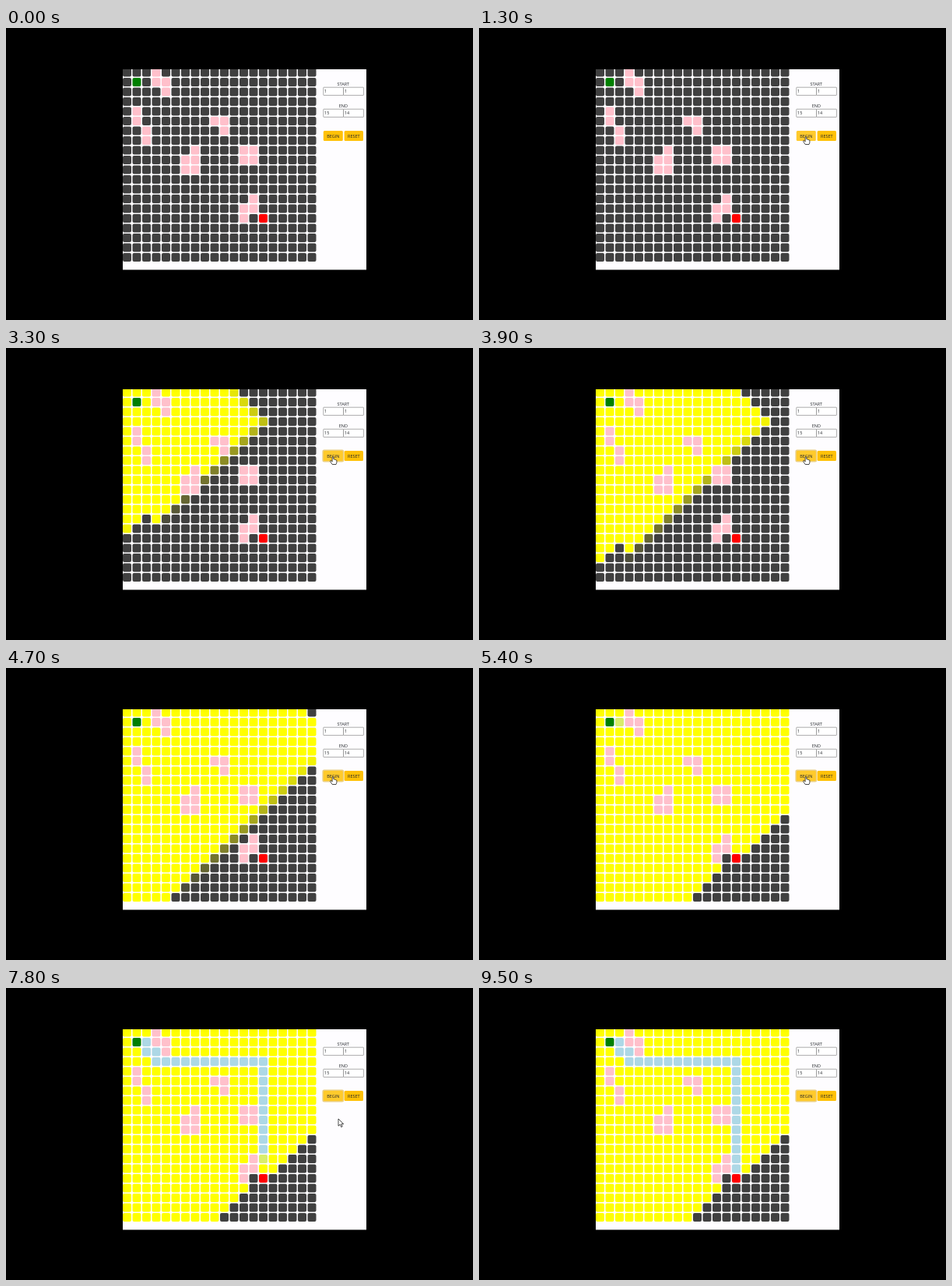
These frames come from a looping animation (600x375 px, 9.6 s). An HTML page:

```html
<!DOCTYPE html>
<html lang="en">
<head>
<meta charset="utf-8">
<title>Breadth-first search</title>
<style>
  html, body { margin: 0; width: 100%; height: 100%; overflow: hidden; background: #000; }
  svg { display: block; width: 100vw; height: 100vh; }
  text { font: 5.5px "Open Sans", "Noto Sans", sans-serif; fill: #212529; }
</style>
</head>
<body>
<svg id="stage" viewBox="0 0 600 375">
  <defs><clipPath id="panel"><rect x="150" y="53" width="313" height="257.5"/></clipPath></defs>
  <rect width="600" height="375"/>
  <rect x="150" y="53" width="313" height="257.5" fill="#fefdff"/>
  <g id="grid" clip-path="url(#panel)"></g>
  <g id="form"></g>
  <g id="arrow" display="none">
    <path d="M0 0V9.2L2.2 7.2L3.7 10.6L5.2 9.9L3.8 6.7H6.7Z" fill="#fff" stroke="#000" stroke-width=".7"/>
  </g>
  <g id="hand" display="none">
    <path d="M-.9 .6Q0 -.6 .9 .6V3.4Q1.9 2.9 2.4 3.8Q3.4 3.4 3.8 4.3Q4.8 4.2 4.9 5.2V7.2Q4.8 8.6 4 10H-.8Q-2.4 8 -3.4 5.9Q-3.4 4.7 -2.2 5.1L-.9 6.4Z"
      fill="#fff" stroke="#000" stroke-width=".7" stroke-linejoin="round"/>
  </g>
</svg>
<script>
const LOOP = 9600, STEP = 100, SIZE = 20;
const VISIT_AT = 1970, VISIT_GAP = 10, PATH_AT = 5330, PATH_GAP = 100, FADE = 150;
const DARK = [64, 64, 64], YELLOW = [255, 255, 0], BLUE = [173, 216, 230];
const AMBER = [255, 193, 7], AMBER_HOVER = [255, 202, 44];
const START = [1, 1], END = [14, 15];
const WALLS = {
  0: [3], 1: [3, 4], 2: [4], 4: [1], 5: [1, 9, 10], 6: [2, 10], 7: [2],
  8: [7, 12, 13], 9: [6, 7, 12, 13], 10: [6, 7], 13: [13], 14: [12, 13], 15: [12]
};
// Pointer stops: time, x, y
const POINTER_IN = [[600, 289, 241], [800, 322, 216], [1000, 376, 172], [1200, 415, 143], [1300, 420, 139.5]];
const POINTER_OUT = [[7400, 420, 139.5], [7800, 427, 168], [8100, 449, 230], [8300, 451, 258], [8600, 447, 242], [8900, 455, 186]];

const $ = id => document.getElementById(id);
const clamp = v => Math.max(0, Math.min(1, v));
const mix = (a, b, k) => a.map((v, i) => v + (b[i] - v) * k);
const rgb = c => `rgb(${c.map(Math.round)})`;
const key = (x, y) => y * SIZE + x;
const isWall = (x, y) => (WALLS[y] || []).includes(x);

function add(parent, tag, attrs, label) {
  const el = document.createElementNS("http://www.w3.org/2000/svg", tag);
  for (const name in attrs) el.setAttribute(name, attrs[name]);
  if (label) el.textContent = label;
  return parent.appendChild(el);
}

function search() {
  const first = key(...START), goal = key(...END);
  const parent = new Map([[first, -1]]), order = [first];
  for (let i = 0; i < order.length && !parent.has(goal); i++) {
    const x = order[i] % SIZE, y = Math.floor(order[i] / SIZE);
    for (const [dx, dy] of [[0, -1], [1, 0], [0, 1], [-1, 0]]) {
      const nx = x + dx, ny = y + dy, id = key(nx, ny);
      if (nx < 0 || ny < 0 || nx >= SIZE || ny >= SIZE || isWall(nx, ny) || parent.has(id)) continue;
      parent.set(id, order[i]);
      if (id === goal) break;
      order.push(id);
    }
  }
  const path = [];
  for (let id = parent.get(goal); id !== first; id = parent.get(id)) path.unshift(id);
  return { order, path };
}

const cells = [];
for (let y = 0; y < SIZE; y++) for (let x = 0; x < SIZE; x++) {
  const id = key(x, y);
  const fill = id === key(...START) ? "green" : id === key(...END) ? "red" : isWall(x, y) ? "pink" : rgb(DARK);
  cells.push(add($("grid"), "rect", { x: 150 + 12.5 * x, y: 51.5 + 12.5 * y, width: 11, height: 11, rx: 2, fill }));
}
const { order, path } = search();
const pathIndex = new Map(path.map((id, i) => [id, i]));

function field(label, y, values) {
  add($("form"), "text", { x: 433.3, y, "text-anchor": "middle" }, label);
  values.forEach((value, i) => {
    const x = 407.8 + 25.8 * i;
    add($("form"), "rect", { x, y: y + 2.2, width: 25.8, height: 10.2, rx: .5, fill: "#fff", stroke: "#767676", "stroke-width": .6 });
    add($("form"), "text", { x: x + 1.3, y: y + 9.4 }, value);
  });
}

function button(label, x, width) {
  const box = add($("form"), "rect", { x, y: 132, width, height: 13, rx: 1.5, fill: rgb(AMBER) });
  add($("form"), "text", { x: x + width / 2, y: 140.5, "text-anchor": "middle" }, label);
  return box;
}

field("START", 74, [1, 1]);
field("END", 102, [15, 14]);
const glow = add($("form"), "rect", { x: 406.4, y: 130.6, width: 27.8, height: 15.8, rx: 2.5, fill: "rgb(217,164,6)", opacity: 0 });
const begin = button("BEGIN", 407.8, 25);
button("RESET", 434.6, 24.4);

function along(stops, t) {
  let i = 1;
  while (i < stops.length - 1 && t > stops[i][0]) i++;
  const [a, b] = [stops[i - 1], stops[i]];
  return mix(a, b, clamp((t - a[0]) / (b[0] - a[0]))).slice(1);
}

function render(t) {
  order.forEach((id, i) => {
    if (!i) return;
    const seen = clamp((t - VISIT_AT - i * VISIT_GAP) / FADE);
    let color = mix(DARK, YELLOW, seen);
    if (pathIndex.has(id)) {
      color = mix(color, BLUE, clamp((t - PATH_AT - pathIndex.get(id) * PATH_GAP) / FADE));
    }
    cells[id].setAttribute("fill", rgb(color));
  });

  begin.setAttribute("fill", rgb(mix(AMBER, AMBER_HOVER, clamp((t - 1150) / FADE))));
  glow.setAttribute("opacity", .5 * clamp((t - 1800) / FADE));

  const [x, y] = along(t < 5000 ? POINTER_IN : POINTER_OUT, t);
  const visible = t >= 600 && t < 8900;
  const onButton = x > 407 && x < 433 && y > 132 && y < 145;
  for (const [id, on] of [["hand", onButton], ["arrow", !onButton]]) {
    $(id).setAttribute("display", visible && on ? "inline" : "none");
    $(id).setAttribute("transform", `translate(${x} ${y})`);
  }
}

const origin = performance.now();
function tick() {
  const t = (performance.now() - origin) % LOOP;
  render(Math.floor(t / STEP) * STEP);
  requestAnimationFrame(tick);
}
tick();
</script>
</body>
</html>
```
